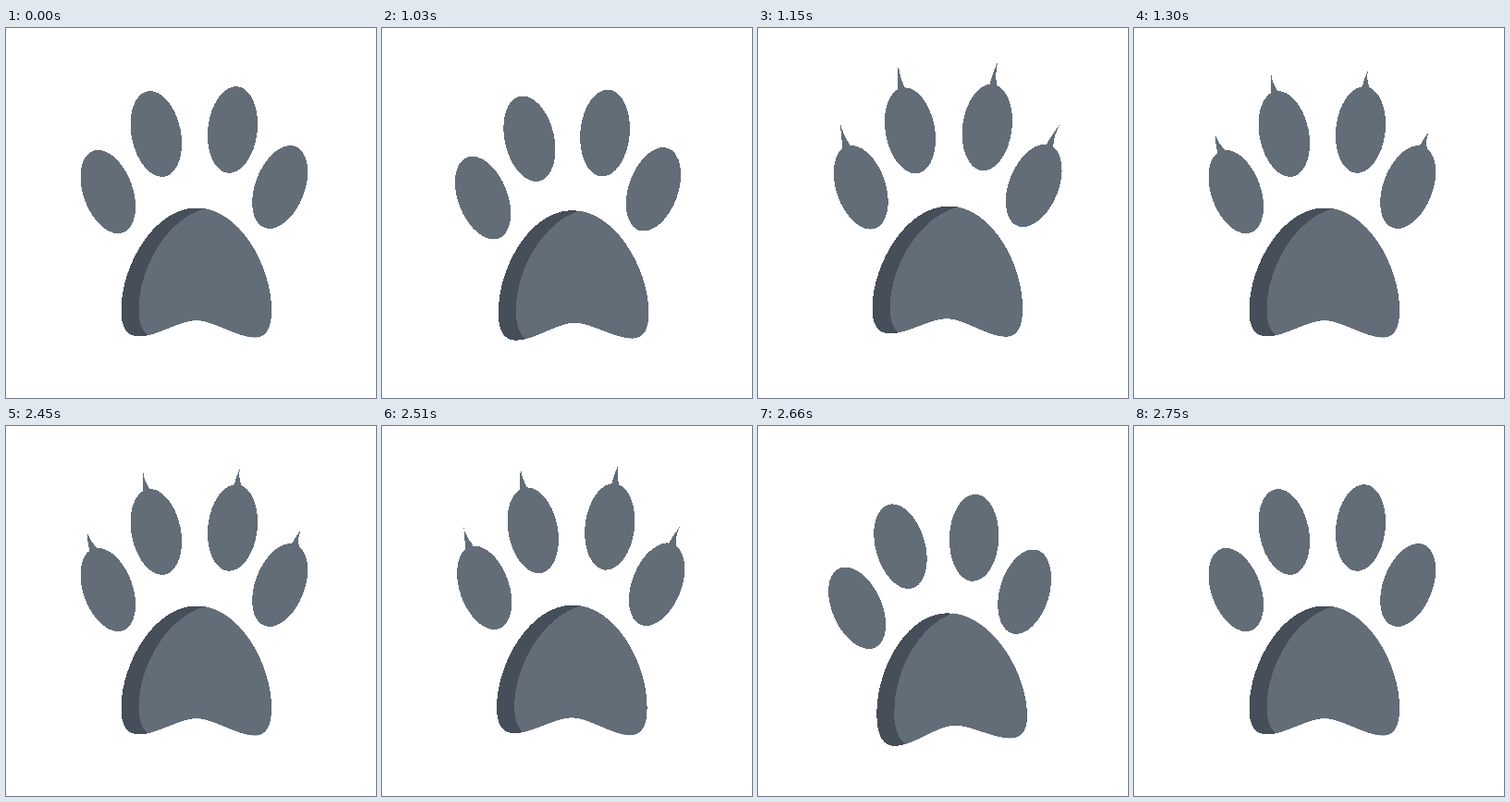
An HTML page for the animation above (2780 ms loop, 400 px wide and 400 px high).

```html
<!DOCTYPE html>
<html lang="en">
<head>
<meta charset="utf-8">
<title>Paw</title>
<style>
  html, body { margin: 0; height: 100%; overflow: hidden; background: #fff; }
  svg { display: block; width: 100%; height: 100%; shape-rendering: crispEdges; }
</style>
</head>
<body>
<svg viewBox="0 0 400 400">
  <defs>
    <path id="pad" d="M206 194.5C160 194.5 124.5 257 124.5 305C124.5 325 131 333.5 144 333.5
      C162 333.5 188 316 206 316C224 316 250 334.5 269 334.5C281 334.5 287 325 287 305
      C287 257 252 194.5 206 194.5Z"/>
    <clipPath id="inPad"><use href="#pad"/></clipPath>
  </defs>
  <g id="paw" fill="#636d77">
    <use href="#pad" fill="#454e59"/>
    <path clip-path="url(#inPad)" d="M214 195.5C176 206 143.5 257 143.5 305
      C143.5 318 147 328 154 333V340H300V190H214Z"/>
  </g>
</svg>
<script>
const LOOP = 2780, STEP = 30;
const paw = document.getElementById('paw');

// Ellipse centre and tilt, drift while the paw presses down, claw root and tip offset
const toes = [
  { x: 110.3, y: 177, tilt: -20, drift: [.7, 1.6], root: [93.5, 131], tip: [-5.5, -15.5] },
  { x: 162.3, y: 114.5, tilt: -11.5, drift: [.6, 1.5], root: [152, 69], tip: [-3.5, -18] },
  { x: 245, y: 110, tilt: 6.5, drift: [-.3, 1.9], root: [250.5, 64], tip: [2.3, -18] },
  { x: 296.2, y: 172, tilt: 21, drift: [-.7, 2], root: [312.5, 128], tip: [6.5, -16] }
];

function add(parent, name, attributes = {}) {
  const node = document.createElementNS('http://www.w3.org/2000/svg', name);
  for (const key in attributes) node.setAttribute(key, attributes[key]);
  return parent.appendChild(node);
}

for (const toe of toes) {
  toe.group = add(paw, 'g');
  toe.claw = add(toe.group, 'path');
  add(toe.group, 'ellipse', {
    rx: 26.7, ry: 47, transform: `translate(${toe.x} ${toe.y}) rotate(${toe.tilt})`
  });
}

// Keys are [time, value] pairs, eased in and out
function track(keys, time) {
  if (time <= keys[0][0]) return keys[0][1];
  for (let i = 1; i < keys.length; i++) {
    const [t0, v0] = keys[i - 1], [t1, v1] = keys[i];
    if (time < t1) {
      const x = (time - t0) / (t1 - t0);
      return v0 + (v1 - v0) * x * x * (3 - 2 * x);
    }
  }
  return keys[keys.length - 1][1];
}

const liftKeys = [[6, 0], [82, -3], [160, .74], [305, 0]];
const clawKeys = [[82, 0], [160, 1.43], [305, 1]];

// Both edges bow to the left; the claw leans right as it grows
function clawPath({ root: [x, y], tip: [dx, dy] }, size) {
  if (size < .05) return '';
  const tipX = x + dx * size + 3 * (size - 1), tipY = y + dy * size;
  const bend = (edge, bow) => `${(edge + tipX) / 2 - bow} ${(y + tipY) / 2}`;
  const left = x - 4, right = x + 4;
  return `M${left} ${y + 6}V${y}Q${bend(left, 1)} ${tipX} ${tipY}` +
    `Q${bend(right, 2.5)} ${right} ${y}V${y + 6}Z`;
}

// The claws come out on a press, then the same move runs backwards
function phase(t) {
  const since = start => STEP * Math.floor((t - start) / STEP);
  if (t < 1030) return 0;
  if (t < 2450) return Math.min(305, 35 + since(1030));
  return Math.max(0, 300 - since(2450));
}

function draw(now) {
  const time = phase(now % LOOP);
  const lift = track(liftKeys, time), size = track(clawKeys, time);
  paw.setAttribute('transform',
    `translate(${-.3 * lift} ${-2.7 * lift}) rotate(${1.5 * lift} 206 265)`);
  for (const toe of toes) {
    const [dx, dy] = toe.drift;
    toe.group.setAttribute('transform', `translate(${-dx * lift} ${-dy * lift})`);
    toe.claw.setAttribute('d', clawPath(toe, size));
  }
}

const start = performance.now();
function tick() {
  draw(performance.now() - start);
  requestAnimationFrame(tick);
}
tick();
</script>
</body>
</html>
```
